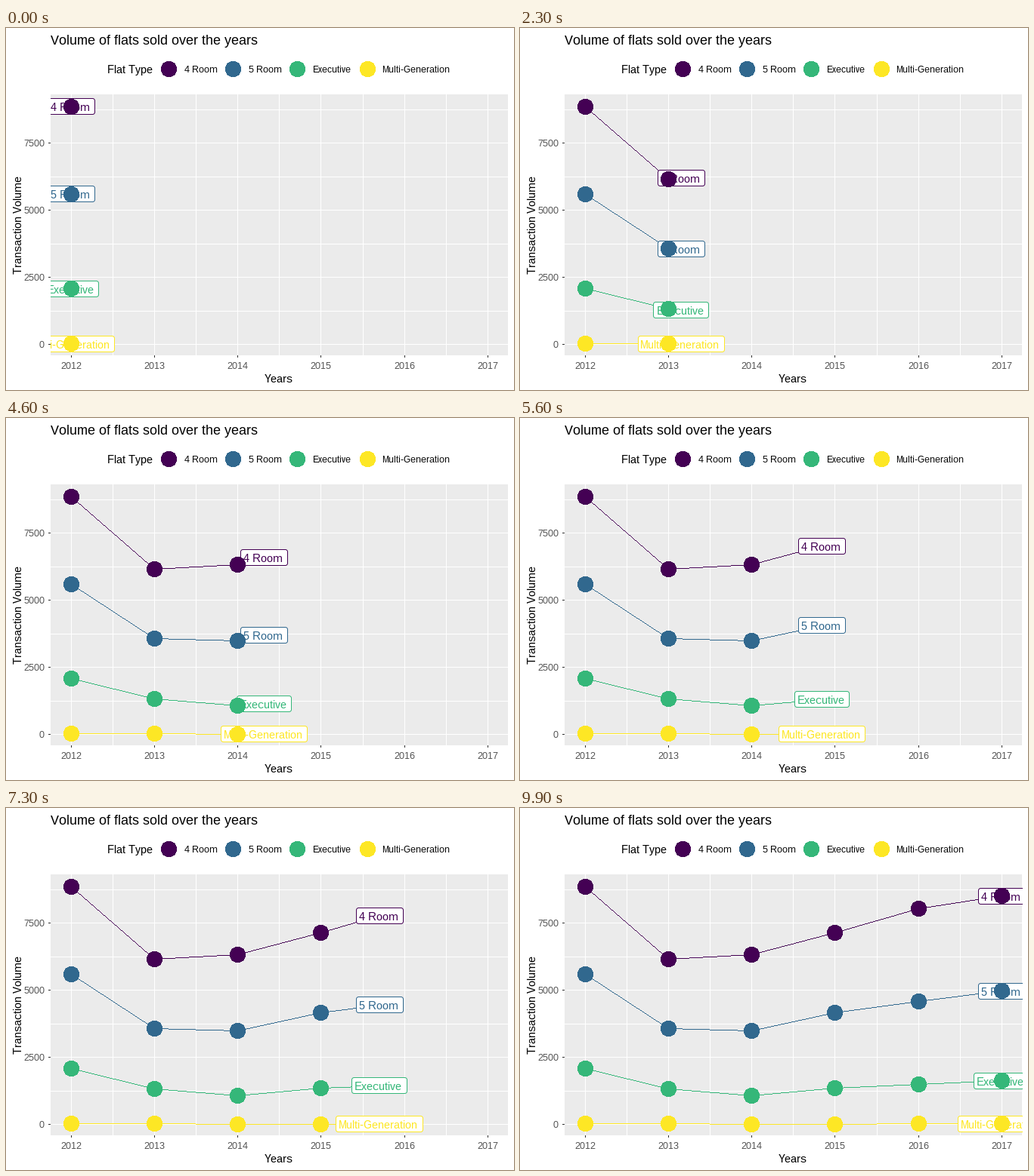
These frames come from a looping animation (672 by 480 pixels, 10 s). A matplotlib script:

```python
import numpy as np
import matplotlib.pyplot as plt
from matplotlib.animation import FuncAnimation
from matplotlib.patches import Circle, FancyBboxPatch, Rectangle

plt.rcParams.update({
    "font.family": "Liberation Sans",
    "text.hinting": "native",
    "text.hinting_factor": 1,
    "text.kerning_factor": 10,  # large enough to switch kerning off
    "path.simplify": False,
})

W, H, DPI = 672, 480, 96
FRAMES, INTERVAL = 100, 100
PX = 72 / DPI  # points per pixel

YEARS = np.arange(2012, 2018)
KEYS = [0, 20, 40, 59, 79, 99]  # frame at which each year is reached
BOX_H = 21

# name, colour, yearly volumes, label width, legend dot x, legend text x
SERIES = [
    ("4 Room", "#440154", [8855, 6165, 6330, 7140, 8042, 8502], 62, 215.5, 236),
    ("5 Room", "#31688E", [5600, 3559, 3483, 4157, 4579, 4963], 62, 300.5, 321),
    ("Executive", "#35B779", [2070, 1312, 1065, 1340, 1489, 1621], 72.6, 385.5, 405),
    ("Multi-Generation", "#FDE725", [25, 24, 6, 9, 20, 25], 114.44, 478.5, 497),
]


def x_px(year):
    return 86.68 + 110.1 * (np.asarray(year) - 2012)


def y_px(volume):
    return 419.55 - 0.0356 * np.asarray(volume)


def mid(v):
    """Centre of the pixel that holds v."""
    return np.floor(v) + 0.5


fig = plt.figure(figsize=(W / DPI, H / DPI), dpi=DPI, facecolor="white")
ax = fig.add_axes([0, 0, 1, 1])
ax.set(xlim=(0, W), ylim=(H, 0))
ax.axis("off")


def text(x, y, s, size, color="black", ha="left", **kw):
    return ax.text(x, y, s, fontsize=size * PX, color=color, ha=ha,
                   va="baseline", **kw)


def line(xs, ys, color, z=1):
    return ax.plot(xs, ys, color=color, lw=PX, zorder=z, snap=False,
                   solid_capstyle="butt")[0]


def dot(x, y, color):
    return ax.add_patch(Circle((x, y), 10.1, fc=color, ec="none", zorder=6,
                               antialiased=False))


def stairs(xs, ys):
    """One-pixel steps, column by column, along a polyline."""
    xs, ys = np.floor(xs), np.floor(ys)
    cols = np.arange(xs[0], xs[-1] + 1)
    rows = mid(np.interp(cols, xs, ys) + 0.5)
    gaps = np.full_like(cols, np.nan)
    return np.column_stack([cols, cols + 1, gaps]).ravel(), np.repeat(rows, 3)


ax.add_patch(Rectangle((59, 88), 605, 346, fc="#EBEBEB", ec="none",
                       zorder=0, snap=False))
view = Rectangle((59, 88), 606, 346, transform=ax.transData)

# Grid, ticks and axis text
for year in np.arange(2012, 2017.5, 0.5):
    line([mid(x_px(year))] * 2, [88, 434], "white")
for volume in range(0, 8751, 1250):
    line([59, 664], [mid(y_px(volume))] * 2, "white")
for year in YEARS:
    x = mid(x_px(year))
    line([x, x], [434, 437], "#333333")
    text(x, 452, str(year), 12, "#4D4D4D", "center")
for volume in range(0, 7501, 2500):
    y = mid(y_px(volume))
    line([56, 59], [y, y], "#333333")
    text(51, y + 4.5, str(volume), 12, "#4D4D4D", "right")

text(59, 22, "Volume of flats sold over the years", 18)
text(361, 470, "Years", 15, ha="center")
ax.text(24, 261.5, "Transaction Volume", fontsize=15 * PX, rotation=90,
        ha="right", va="center")
text(134, 60, "Flat Type", 15)


class Track:
    """One flat type: trail, travelling label and the dots left behind."""

    def __init__(self, name, color, volumes, width, dot_x, text_x):
        dot(dot_x, 54.5, color)
        text(text_x, 59, name, 12)
        self.ys = y_px(volumes)
        self.width = width
        self.trail = line([], [], color, 2)
        self.box = FancyBboxPatch((0, 0), width, BOX_H, fc="white", ec=color,
                                  boxstyle="round,pad=0,rounding_size=3",
                                  lw=PX, zorder=4, snap=False)
        ax.add_patch(self.box)
        self.label = text(0, 0, name, 15, color, "center", zorder=5,
                          clip_on=True)
        self.dots = [dot(mid(x_px(t)), mid(y), color)
                     for t, y in zip(YEARS, self.ys)]
        for artist in (self.trail, self.box, self.label):
            artist.set_clip_path(view)

    def move(self, frame, year):
        passed = int(np.sum(np.array(KEYS) <= frame))
        x, y = x_px(year), np.interp(year, YEARS, self.ys)
        self.trail.set_data(*stairs(np.append(x_px(YEARS[:passed]), x),
                                    np.append(self.ys[:passed], y)))
        left, right = mid(x - self.width / 2), mid(x + self.width / 2)
        top = mid(y - BOX_H / 2)
        self.box.set_bounds(left, top, right - left, BOX_H)
        self.label.set_position((x - 1.5, top + BOX_H - 4.5))
        for i, d in enumerate(self.dots):
            d.set_visible(i < passed)


tracks = [Track(*s) for s in SERIES]


def draw(frame):
    year = np.interp(frame, KEYS, YEARS)
    for track in tracks:
        track.move(frame, year)
    return []


anim = FuncAnimation(fig, draw, frames=FRAMES, init_func=lambda: draw(0),
                     interval=INTERVAL, repeat=True, repeat_delay=0,
                     blit=False)
plt.show()
```
